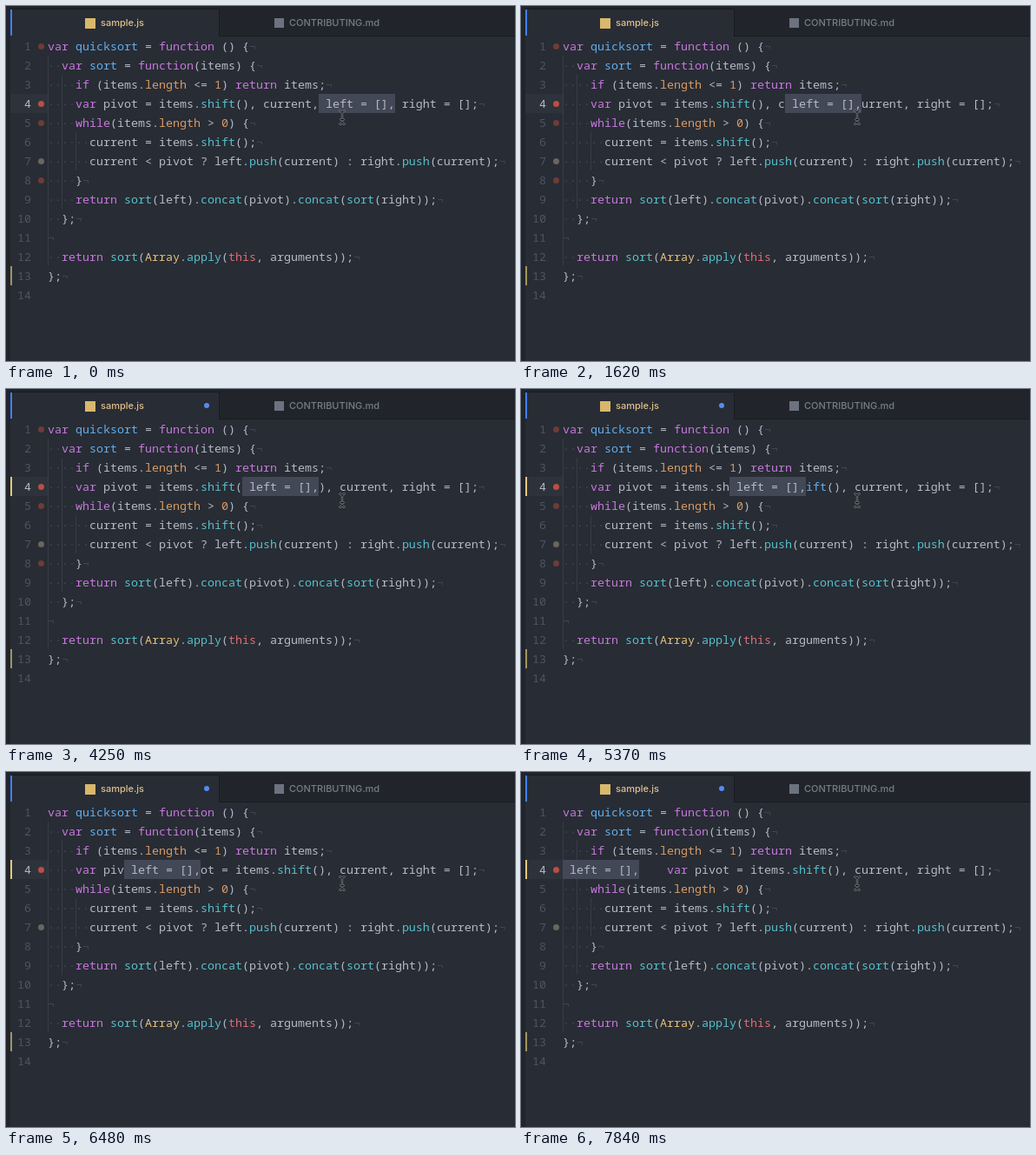
An HTML page that plays this animation: 586x408 px, repeating every 8 s.

```html
<!DOCTYPE html>
<html lang="en">
<head>
<meta charset="utf-8">
<title>Moving a selection</title>
<style>
  html, body { margin: 0; width: 100%; height: 100%; overflow: hidden; background: #21252b; }
  #stage { position: relative; width: 586px; height: 408px; overflow: hidden; background: #21252b; }
  #stage div, #stage svg { position: absolute; }
  .editor { left: 5px; top: 35px; width: 581px; height: 373px; background: #282c34; }
  .bar { left: 5px; top: 34px; width: 581px; height: 1px; background: #181a1f; }
  .tab { left: 5px; top: 4px; width: 240px; height: 31px; background: #282c34;
    box-shadow: 1px 0 #181a1f, 0 -1px #181a1f; }
  .accent { left: 5px; top: 4px; width: 2px; height: 30px; background: #437ff2; }
  .title { top: 9px; font: 500 11px/20px Inter, sans-serif; white-space: pre; }
  .line, .num { font: 500 13.3333px/22px "Noto Sans Mono", monospace; white-space: pre; height: 22px;
    font-variant-ligatures: none; }
  .line { left: 48px; color: #b4bbc8; }
  .num { right: 557px; color: #4d5463; font-weight: 400; }
  .num.on { color: #b4bbc8; }
  .guide { width: 1px; height: 22px; background: #383d47; }
  .dot { border-radius: 50%; }
  .git { left: 5px; width: 2px; height: 22px; }
  #sel { top: 101px; height: 22px; background: #434857; }
  .k { color: #c678dd; } .f { color: #61afef; } .s { color: #56c0cc; }
  .n { color: #d79c66; } .t { color: #e06c75; } .c { color: #e5c07b; }
  .i { color: #434954; }
</style>
</head>
<body>
<div id="stage">
  <div class="editor"></div>
  <div class="bar"></div>
  <div class="tab"></div>
  <div class="accent"></div>
  <div style="left:91px;top:14px;width:12px;height:12px;background:#d9b86c"></div>
  <div class="title" style="left:109px;color:#e2c08d">sample.js</div>
  <div id="dirty" class="dot" style="left:228px;top:16px;width:6px;height:6px;background:#568af2"></div>
  <div style="left:309px;top:14px;width:11px;height:11px;background:#6c737f"></div>
  <div class="title" style="left:326px;color:#767d89">CONTRIBUTING.md</div>
  <div style="left:5px;top:101px;width:43px;height:22px;background:#2e323b"></div>
  <div id="sel"></div>
  <div id="code"></div>
  <div id="edited" class="git" style="top:101px;background:#e5c67e"></div>
  <div class="git" style="top:299px;background:#a0965f"></div>
  <svg style="left:381px;top:118px" width="12" height="20" fill="none" stroke-linecap="round">
    <defs>
      <path id="beam" d="M3.5 2.5Q5.5 2.5 6 4.5Q6.5 2.5 8.5 2.5M6 4.5V15.5M3.5 17.5Q5.5 17.5 6 15.5Q6.5 17.5 8.5 17.5M4.5 12.5H7.5"/>
    </defs>
    <use href="#beam" stroke="#a4a8b0" stroke-width="2.2"/>
    <use href="#beam" stroke="#111" stroke-width="1.1"/>
  </svg>
</div>
<script>
const LOOP = 8000, CELL = 8, ROW = 22, LEFT = 48, TOP = 35;
const PICK = ' left = [],';
const BASE = '    var pivot = items.shift(), current, right = [];';
const SOURCE = [
  'var quicksort = function () {',
  '  var sort = function(items) {',
  '    if (items.length <= 1) return items;',
  BASE,
  '    while(items.length > 0) {',
  '      current = items.shift();',
  '      current < pivot ? left.push(current) : right.push(current);',
  '    }',
  '    return sort(left).concat(pivot).concat(sort(right));',
  '  };',
  '',
  '  return sort(Array.apply(this, arguments));',
  '};'
];

// [time, column where the picked text sits]
const MOVES = [
  [0, 39], [500, 38], [620, 37], [850, 36], [1030, 35], [1200, 34], [1380, 33],
  [1620, 32], [1860, 31], [2510, 30], [4040, 29], [4190, 28], [4420, 27],
  [4540, 26], [4830, 25], [5370, 24], [5430, 23], [5580, 22], [5640, 21],
  [5700, 20], [5760, 19], [5880, 17], [5970, 16], [6060, 15], [6150, 14],
  [6240, 13], [6360, 12], [6480, 11], [6530, 10], [6610, 9], [6700, 8],
  [6790, 7], [6870, 6], [6960, 5], [7040, 4], [7130, 3], [7370, 2], [7660, 1], [7840, 0]
];
const DIRTY_AT = 2160, EDITED_AT = 2220, DOTS_END = 6060;

const RULES = [
  ['k', /^(var|function|if|return|while)\b/],
  ['f', /^(quicksort|sort)(?= =)/],
  ['s', /^(shift|push|concat|sort|apply)(?=\()/],
  ['n', /^(length\b|\d+)/],
  ['t', /^this\b/],
  ['c', /^Array\b/],
  ['f', /^\w+(?=\()/],
  ['', /^(\w+|\W)/]
];

const $ = id => document.getElementById(id);
const code = $('code');
const span = (cls, text) => `<span class="${cls}">${text}</span>`;
const safe = s => s.replace(/</g, '&lt;').replace(/>/g, '&gt;');
const indent = s => s.match(/^ */)[0].length;
const rowTop = i => TOP + i * ROW;
const px = v => v + 'px';

function paint(text) {
  const lead = indent(text);
  let out = span('i', '·'.repeat(lead)), rest = text.slice(lead);
  while (rest) {
    const [cls, re] = RULES.find(r => r[1].test(rest));
    const word = rest.match(re)[0];
    out += cls ? span(cls, word) : safe(word);
    rest = rest.slice(word.length);
  }
  return out + span('i', '¬');
}

function add(cls, style, html = '') {
  const el = document.createElement('div');
  el.className = cls;
  Object.assign(el.style, style);
  el.innerHTML = html;
  code.append(el);
  return el;
}

// The wrapper fills the stage so that its children use stage coordinates.
Object.assign(code.style, { left: 0, top: 0, width: '586px', height: '408px' });

const guides = [];
const lines = SOURCE.map((text, i) => {
  const top = px(rowTop(i));
  const count = text ? indent(text) / 2 : 1;
  for (let g = 0; g < count; g++) {
    const el = add('guide', { left: px(LEFT + g * 2 * CELL), top });
    if (i === 3) guides.push(el);
  }
  return add('line', { top }, paint(text));
});
for (let i = 0; i < 14; i++) add(i === 3 ? 'num on' : 'num', { top: px(rowTop(i)) }, i + 1);

const mark = (row, background) => add('dot', {
  left: '36.5px', top: px(rowTop(row - 1) + 7.5), width: '7px', height: '7px', background
});
const fading = [1, 5, 8].map(row => mark(row, '#6e3c36'));
mark(4, '#b94f43');
mark(7, '#69665f');

let shown = -1;
function place(col) {
  if (col === shown) return;
  shown = col;
  const text = BASE.slice(0, col) + PICK + BASE.slice(col);
  lines[3].innerHTML = paint(text);
  // Inside the indent the selection start snaps back to a two-space stop.
  const start = col < 4 ? col - col % 2 : col;
  $('sel').style.left = px(LEFT + start * CELL);
  $('sel').style.width = px((col + PICK.length - start) * CELL);
  guides.forEach((el, g) => { el.hidden = indent(text) < (g + 1) * 2; });
}

const show = (el, on) => { el.style.visibility = on ? 'visible' : 'hidden'; };

function draw(t) {
  let col = MOVES[0][1];
  for (const [at, c] of MOVES) if (t >= at) col = c;
  place(col);
  show($('dirty'), t >= DIRTY_AT);
  show($('edited'), t >= EDITED_AT);
  fading.forEach(el => show(el, t < DOTS_END));
}

const begin = performance.now();
function tick() {
  draw((performance.now() - begin) % LOOP);
  requestAnimationFrame(tick);
}
draw(0);
requestAnimationFrame(tick);
</script>
</body>
</html>
```
